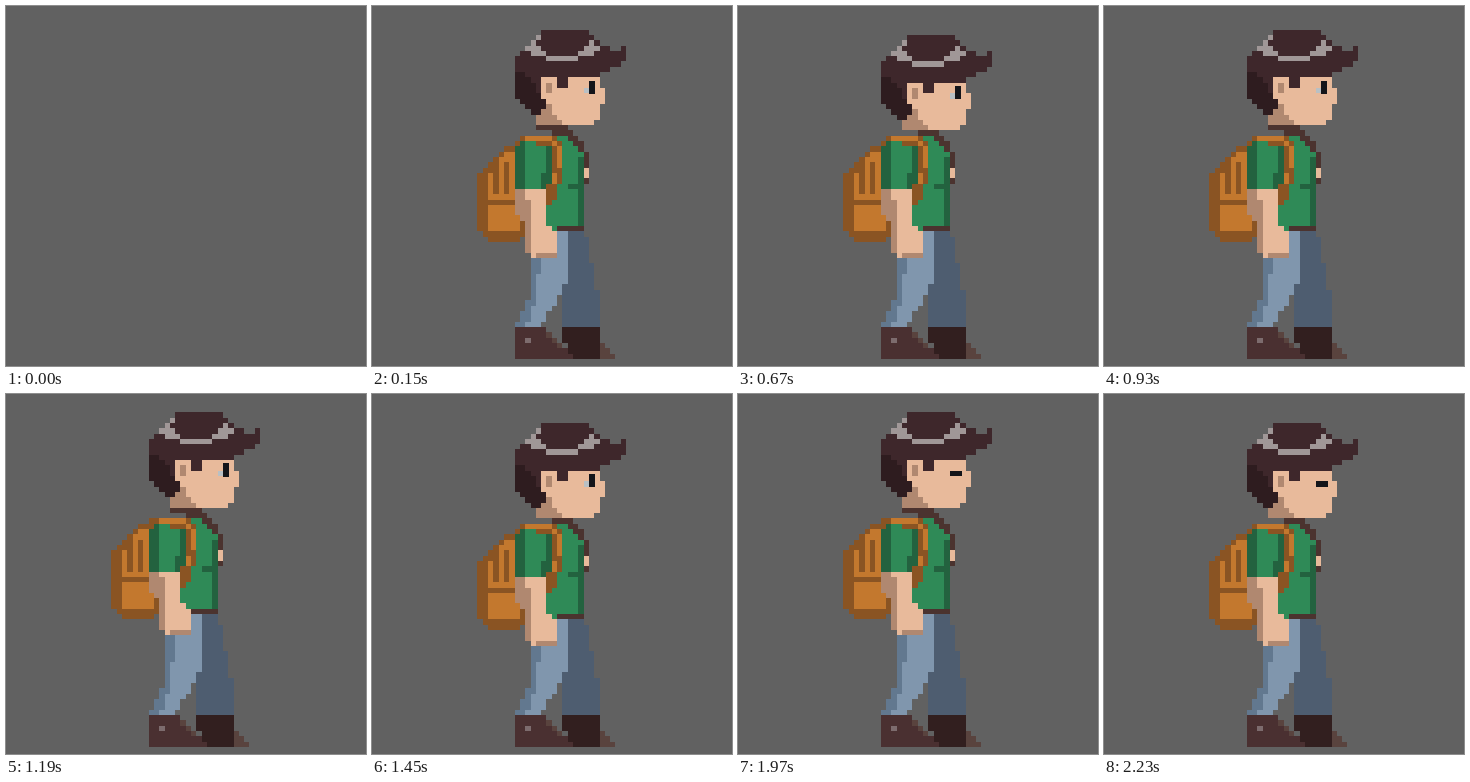
An HTML page with a canvas for the animation above (2.36 s loop, 360x360 px).

```html
<!DOCTYPE html>
<html lang="en">
<head>
<meta charset="utf-8">
<title>Idle walker</title>
<style>
html, body { margin: 0; width: 100%; height: 100%; overflow: hidden; background: #616161; }
canvas { display: block; width: 360px; height: 360px; }
</style>
</head>
<body>
<canvas id="stage" width="360" height="360"></canvas>
<script>
const ctx = document.getElementById('stage').getContext('2d');
const LOOP = 2360, LEAD = 20, STEP = 130, BREATH = 6, BLINK = 15;
const CELL = 5.31, LEFT = 105.4, TOP = 18.3;

const C = {
  hair: '#3e272b', nape: '#2e1c1f', shine: '#a09797', skin: '#e8ba9b', shade: '#b08870',
  green: '#2f8a57', moss: '#23623f', dark: '#4b332f', orange: '#c3782e', rust: '#8a5423',
  blue: '#8096ad', mid: '#62788f', navy: '#4e5d70', boot: '#4a3031', sole: '#321f1f',
  toe: '#59433e', lace: '#7d6c6e', white: '#b9c0c4', black: '#14151a'
};

let sink = 0; // cells by which the current part is lowered

function box(color, x, y, w = 1, h = 1) {
  const px = c => Math.round(LEFT + c * CELL), py = r => Math.round(TOP + (r + sink) * CELL);
  ctx.fillStyle = color;
  ctx.fillRect(px(x), py(y), px(x + w) - px(x), py(y + h) - py(y));
}

// Outline of key points, snapped to every cell whose centre lies inside
function shape(color, outline) {
  const pts = outline.split(' ').map(p => p.split(',').map(Number));
  for (let row = 0; row < 64; row++) {
    const y = row + 0.5, hits = [];
    pts.forEach(([x1, y1], i) => {
      const [x2, y2] = pts[(i + 1) % pts.length];
      if (y1 > y !== y2 > y) hits.push(x1 + (y - y1) / (y2 - y1) * (x2 - x1));
    });
    hits.sort((a, b) => a - b);
    for (let i = 0; i < hits.length; i += 2) {
      const from = Math.round(hits[i]), to = Math.round(hits[i + 1]);
      if (to > from) box(color, from, row, to - from);
    }
  }
}

function legs() {
  shape(C.navy, '17,38 20,38 23,53 23,57 16,57 16,52');
  shape(C.blue, '10,38 17,38 17,48 12,57 7,57 10,51');
  shape(C.mid, '10,42 12,42 11,52 9,57 7,57 10,51');
  shape(C.sole, '16,57 23,57 23,63 17,63');
  shape(C.toe, '23,60 26,62 26,63 23,63');
  shape(C.boot, '7,57 13,57 17.5,62 17.5,63 7,63');
  for (let i = 0; i < 3; i++) box(C.toe, 13 + i, 58 + i);
  box(C.lace, 9, 59);
}

function pack() {
  shape(C.rust, '5,21 9,20 9,37 8,39.4 3,39.4 0,36 0,27');
  shape(C.orange, '5,22 8,22 8,37 2,37 2,27');
  for (const x of [3, 5]) box(C.rust, x, 24, 1, 6);
  box(C.rust, 2, 31, 5);
}

function shirt() {
  shape(C.shade, '11,15 17,15 17,19 11,19');
  shape(C.green, '13,20 17,20 20,24 20,38 13,38');
  box(C.moss, 19, 24, 1, 13);
  box(C.moss, 17, 29, 2);
  box(C.dark, 15, 37, 5);
  shape(C.dark, '11,18 17,18 20,22 21,25 21,29 20,29 20,24 17,20 11,19');
  box(C.skin, 20, 26, 1, 2);
}

function arm() {
  shape(C.skin, '7,27 13,27 13,36 15,37 15,42 11,42 9,41 9,35 7,34');
  shape(C.shade, '7,27 9,27 10,35 10,41 9,41 9,35 7,34');
  box(C.shade, 11, 41, 4);
}

function sleeve() {
  shape(C.moss, '8,21 14,21 15,25 13,30 7,30 7,23');
  shape(C.green, '9,21 12,21 13,24 12,30 9,30');
  shape(C.rust, '8,20 14,20 16,22 16,28 14,33 13,33 13,30 14,28 14,23 13,22 8,21');
  shape(C.orange, '9,20 14,20 16,23 15,28 14,30 15,23 13,21 9,21');
}

function head(shut) {
  shape(C.shade, '11,13 17,13 17,18 11,18');
  shape(C.skin, '12,8 23,8 23,11 24,12 24,13 23,14 23,16 21,18 16,18 14,15 12,13');
  shape(C.hair, '13,0 20,0 23,3 27,4 27,3 28,3 28,5 26,7 22,9 17,9 17,11 15,11 15,9 12,9 12,13 13,14 11,17 7,12 7,5');
  shape(C.nape, '7,8 9,8 13,14 11,17 7,12');
  shape(C.shine, '11,1 21,1 23,4 18,6 14,6 8,4');
  shape(C.hair, '13,0 19,0 21,2 18,5 14,5 11,3');
  box(C.shade, 13, 10, 1, 2);
  if (shut) {
    box(C.black, 20, 11, 2.4);
  } else {
    box(C.white, 20, 11);
    box(C.black, 21, 9.6, 1.2, 2.5);
  }
}

// One breath: zero at the crest, `depth` cells half a cycle later
function breathe(step, depth, crest) {
  const angle = (step - crest) / BREATH * 2 * Math.PI;
  return Math.round(depth * (1 - Math.cos(angle)) / 2 + 0.1);
}

function draw(t) {
  ctx.fillStyle = '#616161';
  ctx.fillRect(0, 0, 360, 360);
  if (t < LEAD) return;
  const step = Math.floor((t - LEAD) / STEP);
  const lift = { head: breathe(step, 2, 2.6), pack: breathe(step, 2, 3), torso: breathe(step, 1, 3) };
  sink = 0;
  legs();
  sink = lift.pack;
  pack();
  sink = lift.torso;
  shirt();
  sink = lift.pack;
  arm();
  sink = lift.torso;
  sleeve();
  sink = lift.head;
  head(step >= BLINK);
}

let start = null;
function tick(now) {
  if (start === null) start = now;
  draw((now - start) % LOOP);
  requestAnimationFrame(tick);
}
draw(0);
requestAnimationFrame(tick);
</script>
</body>
</html>
```
